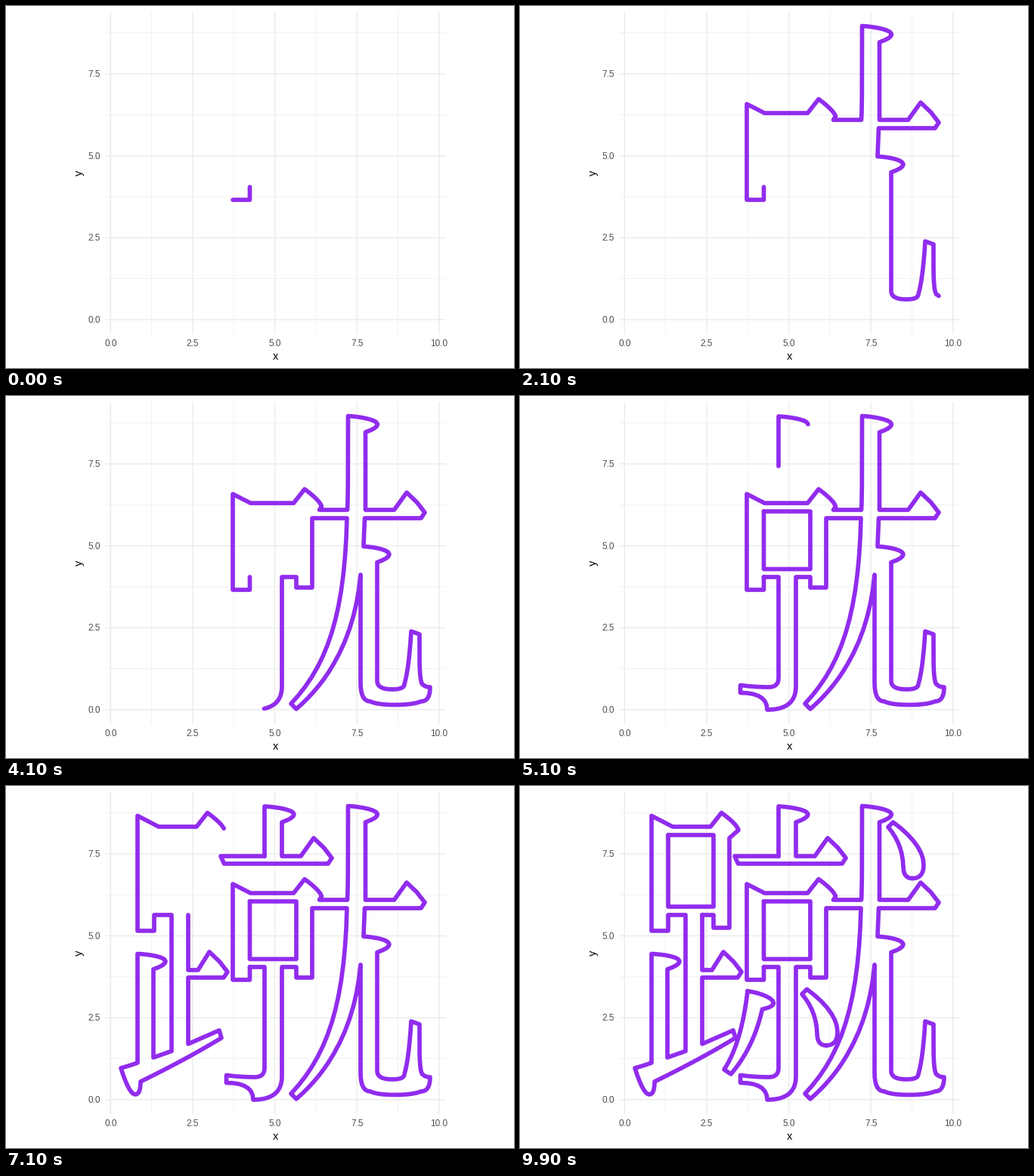
Write a matplotlib script that moves like this. It is 672 px wide and 480 px high and loops after 10 s.

```python
import numpy as np
import matplotlib.pyplot as plt
from matplotlib.animation import FuncAnimation

W, H, DPI, FRAMES = 672, 480, 96, 100
PX = 72 / DPI  # points per pixel
N = 7          # vertices per curve
UNIT, X0, Y0 = 43.45, 138.3, 415.9
LEFT, RIGHT, TOP, BOTTOM = 131.7, 581.7, 7.8, 435.3


class Pen:
    """Collects the vertices of one contour."""

    def __init__(self, x, y):
        self.pts = [(x, y)]

    def line(self, *pts):
        self.pts += pts
        return self

    def steps(self, vals, axis):
        """Axis-parallel moves, switching direction each time."""
        for v in vals:
            p = list(self.pts[-1])
            p[axis] = v
            self.pts.append(tuple(p))
            axis = 1 - axis
        return self

    def hv(self, *vals):
        return self.steps(vals, 0)

    def vh(self, *vals):
        return self.steps(vals, 1)

    def curve(self, *ctrl, n=N):
        """Bezier curve from the current point, flattened to n vertices."""
        ctrl = [np.array(p, float) for p in (self.pts[-1], *ctrl)]
        for t in np.arange(1, n + 1) / n:
            q = ctrl
            while len(q) > 1:
                q = [a + (b - a) * t for a, b in zip(q, q[1:])]
            self.pts.append(tuple(q[0]))
        return self

    def h_bend(self, x, y):
        return self.curve((x, self.pts[-1][1]), (x, y))

    def v_bend(self, x, y):
        return self.curve((self.pts[-1][0], y), (x, y))

    def hook(self, x, y):
        """Rounded head at the top of a vertical stroke."""
        sx, sy = self.pts[-1]
        tx, ty = x + 16, y - 10.5
        self.curve((sx + 12, sy + 0.5), (tx, ty - 6.5), (tx, ty))
        return self.curve((tx, ty + 5), (x, y), n=4)

    def roof(self, x, y):
        """Triangular end of a horizontal stroke."""
        self.line((x, y)).curve((x + 15, y + 12.5), (x + 24, y + 26.5), n=2)
        return self.line((x + 19, y + 34))

    def brow(self, x, y, right):
        """Top edge of a box-shaped part with its raised right corner."""
        self.line((x, y), (right, y), (right + 14.5, y - 18.5))
        return self.curve((right + 29, y - 8), (right + 36, y),
                          (right + 37, y + 4.5))


def box(l, t, r, b):
    return Pen(l, t).vh(b, r, t, l)


def dot(x, y):
    pen = Pen(x, y).h_bend(x - 12, y - 16)
    pen.curve((x - 13, y - 46), (x - 32, y - 68)).line((x - 25.5, y - 74.5))
    pen.curve((x, y - 56), (x + 15, y - 36), (x + 15, y - 18))
    return pen.v_bend(x, y)


def body():
    p = Pen(322.5, 240).vh(257, 300, 130).brow(323.5, 142, 380.5)
    p.line((414.5, 151)).hv(451.5).curve((452, 146), (452.3, 120))
    p.line((452.5, 26.5)).hook(475.5, 48).vh(151, 513.5).roof(530, 128)
    p.hv(474.5).line((473, 199.5)).hook(491, 220.5)
    # upturned tail
    p.vh(378).v_bend(511, 389).h_bend(527, 382).curve((533, 362), (536, 312))
    p.line((547, 316)).vh(345).v_bend(552, 383).curve((555, 386), (561, 386))
    p.v_bend(549, 405).curve((538, 409.5), (515, 409.5))
    p.curve((491, 409.5), (482, 405)).h_bend(469, 380)
    # long sweep, out and back
    p.vh(237).curve((463, 305), (433, 356)).curve((414, 389), (384, 415))
    p.line((377, 408)).curve((425, 357), (448, 290), (451, 162), n=2 * N)
    # hooked leg
    p.hv(405, 254, 384, 240, 365, 385)
    p.curve((365, 416), (327, 416), n=2 * N).v_bend(291.5, 393.5)
    p.vh(383.5).curve((310, 386), (329, 386)).h_bend(342, 374)
    return p.vh(240, 322.5)


def lid():
    p = Pen(342, 93).vh(27).hook(365, 48).vh(93, 390).roof(407, 69)
    return p.hv(288.5).line((284, 93)).hv(342)


def foot():
    p = Pen(241, 171).vh(244, 254).roof(269, 220).hv(241, 342)
    p.line((282, 324), (285, 334)).curve((241, 361), (178, 392))
    p.v_bend(171, 409).curve((163, 409), (152, 374)).curve((163, 371), (174, 367))
    p.vh(222.5).hook(195, 243).vh(360).line((219, 351.5))
    p.vh(171, 196, 192, 174, 39.5).brow(202, 54, 252)
    return p.line((277, 69)).vh(188, 256, 171, 241)


def flick():
    p = Pen(301, 272).curve((315, 273.5), (336, 281), (335.5, 288))
    p.curve((335, 293), (320.5, 296), n=4)
    p.curve((309, 347), (279, 382), n=2 * N)
    return p.line((270, 376)).curve((293, 341), (301, 272), n=2 * N)


pens = [body(), box(322.5, 153, 384, 229.5), lid(), foot(),
        box(196, 65, 256, 160), dot(519, 122.5), dot(405, 344), flick()]
paths = [np.array(p.pts) for p in pens]
ends = np.cumsum([len(p) for p in paths])
shown = np.linspace(3, ends[-1], FRAMES).round().astype(int)

plt.rcParams["path.snap"] = False
fig = plt.figure(figsize=(W / DPI, H / DPI), dpi=DPI, facecolor="white")
ax = fig.add_axes([0, 0, 1, 1])
ax.set_xlim(0, W)
ax.set_ylim(H, 0)
ax.axis("off")

for width, first in ((0.71, 1.25), (1.42, 0)):
    style = dict(colors="#EBEBEB", linewidths=width * PX)
    ax.vlines(X0 + UNIT * np.arange(first, 10.1, 2.5), TOP, BOTTOM, **style)
    ax.hlines(Y0 - UNIT * np.arange(first, 9, 2.5), LEFT, RIGHT, **style)

font = dict(family="Liberation Sans", va="baseline")
tick = dict(font, size=8.8, color="#4D4D4D")
for v in np.arange(0, 10.1, 2.5):
    ax.text(X0 + UNIT * v, 451, f"{v:.1f}", ha="center", **tick)
    if v < 9:
        ax.text(124.6, Y0 - UNIT * v + 4.2, f"{v:.1f}", ha="right", **tick)
ax.text(356.7, 468.6, "x", ha="center", size=11, color="black", **font)
ax.text(101.3, 221.5, "y", ha="center", size=11, color="black",
        rotation=90, rotation_mode="anchor", **font)

lines = [ax.plot([], [], color="#912CEE", lw=5.69 * PX, solid_capstyle="round",
                 solid_joinstyle="round", zorder=5)[0] for _ in paths]


def draw(i):
    for line, path, end in zip(lines, paths, ends):
        count = np.clip(shown[i] - end + len(path), 0, len(path))
        line.set_data(*path[:count].T)
    return lines


anim = FuncAnimation(fig, draw, frames=FRAMES, interval=100, repeat=True)
plt.show()
```
